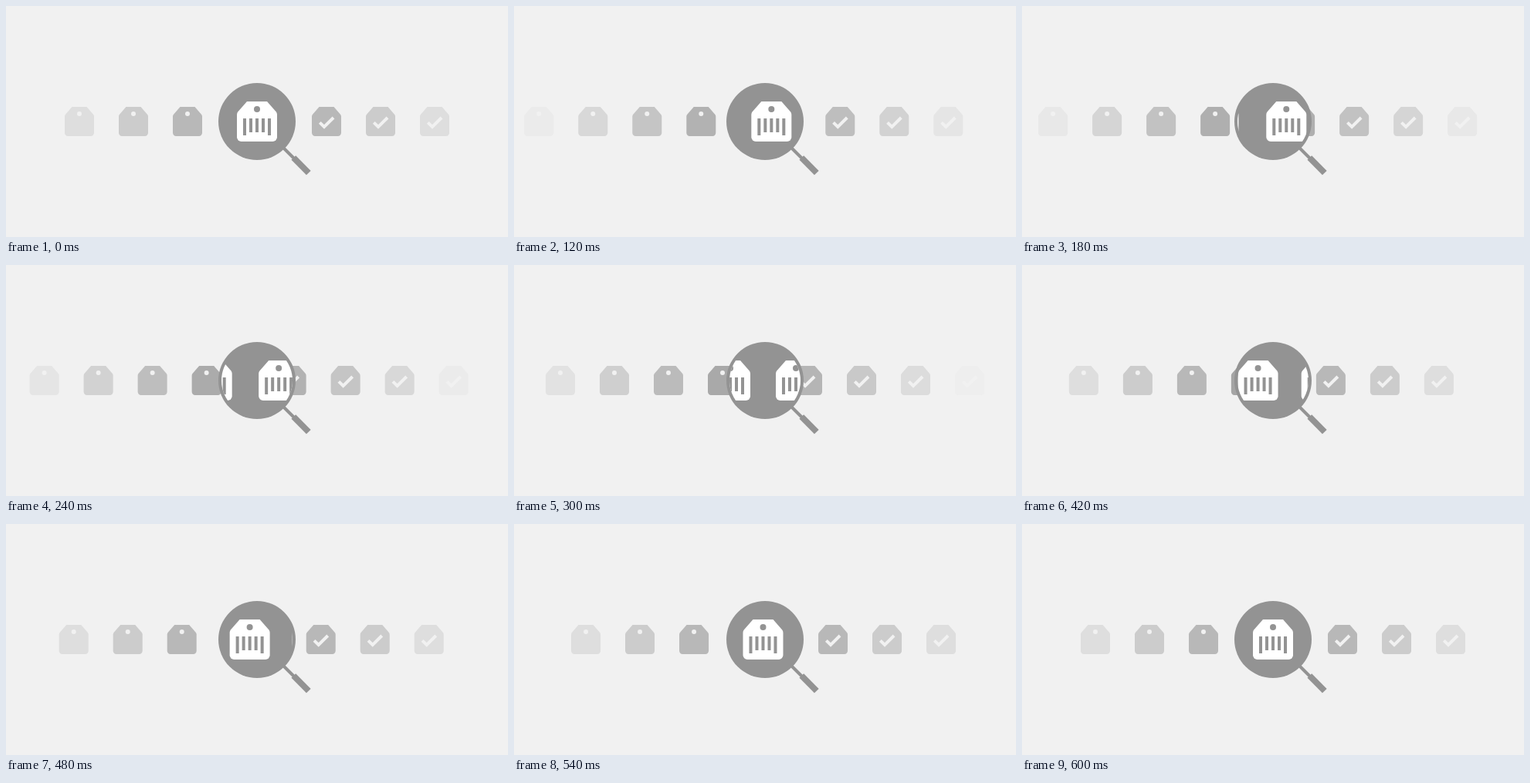
These frames come from a looping animation (650x300 px, 0.9 s). An HTML page with a canvas:

```html
<!DOCTYPE html>
<html lang="en">
<head>
<meta charset="utf-8">
<title>Tag scanner</title>
<style>
  html, body { margin: 0; width: 100%; height: 100%; overflow: hidden; background: #f1f1f1; }
  canvas { display: block; }
</style>
</head>
<body>
<canvas id="stage" width="650" height="300"></canvas>
<script>
const ctx = document.getElementById('stage').getContext('2d');
const BG = '#f1f1f1', GREY = '#939393';
const LOOP = 900, MOVE = 600, FADE = 360, STEP = 30;
const CX = 325, CY = 150;

function line(points, width, color) {
  ctx.beginPath();
  points.forEach(([x, y]) => ctx.lineTo(x, y));
  ctx.lineWidth = width;
  ctx.strokeStyle = color;
  ctx.stroke();
}

function disc(x, y, r, color) {
  ctx.beginPath();
  ctx.arc(x, y, r, 0, Math.PI * 2);
  ctx.fillStyle = color;
  ctx.fill();
}

// Tag outline centred on the origin, h = half its size
function tag(h, color) {
  const top = h * 0.5, shoulder = -h * 0.43, r = h * 0.22;
  ctx.beginPath();
  ctx.moveTo(-top, -h);
  ctx.lineTo(top, -h);
  ctx.arcTo(h, shoulder, h, h, r);
  ctx.arcTo(h, h, -h, h, r);
  ctx.arcTo(-h, h, -h, shoulder, r);
  ctx.arcTo(-h, shoulder, -top, -h, r);
  ctx.closePath();
  ctx.fillStyle = color;
  ctx.fill();
}

function at(x, drawItem) {
  ctx.save();
  ctx.translate(x, CY);
  drawItem();
  ctx.restore();
}

function smallTag(x, alpha, checked) {
  if (alpha <= 0) return;
  at(x, () => {
    ctx.globalAlpha = alpha;
    tag(19, GREY);
    ctx.globalAlpha = 1;
    if (checked) line([[-8.7, 1.3], [-3, 7], [9, -5]], 4, BG);
    else disc(0, -10, 3, BG);
  });
}

function largeTag(x) {
  at(x, () => {
    tag(26, '#fff');
    disc(0, -16, 4, GREY);
    for (let i = -2; i <= 2; i++) {
      ctx.fillRect(i * 8 - 2, -4, 4, Math.abs(i) === 2 ? 22 : 18);
    }
  });
}

function draw(time) {
  const t = Math.min(MOVE, Math.floor(time % LOOP / STEP) * STEP);
  const u = t / MOVE;
  const p = u * u * (3 - 2 * u);
  const fade = Math.min(1, t / FADE);

  ctx.fillStyle = BG;
  ctx.fillRect(0, 0, 650, 300);

  for (let i = 0; i < 4; i++) {
    smallTag(25 + 70 * (i + p), 0.2 * (i + fade), false);
    smallTag(345 + 70 * (i + p), 0.2 * (4 - i - fade), true);
  }

  line([[358, 183], [374, 199]], 4, GREY);
  line([[372.3, 197], [391.8, 216.8]], 8, GREY);
  disc(CX, CY, 50, GREY);

  ctx.save();
  ctx.beginPath();
  ctx.arc(CX, CY, 46, 0, Math.PI * 2);
  ctx.clip();
  largeTag(CX - 90 * (1 - p));
  largeTag(CX + 80 * p);
  ctx.restore();
}

function tick() {
  draw(performance.now());
  requestAnimationFrame(tick);
}
tick();
</script>
</body>
</html>
```
